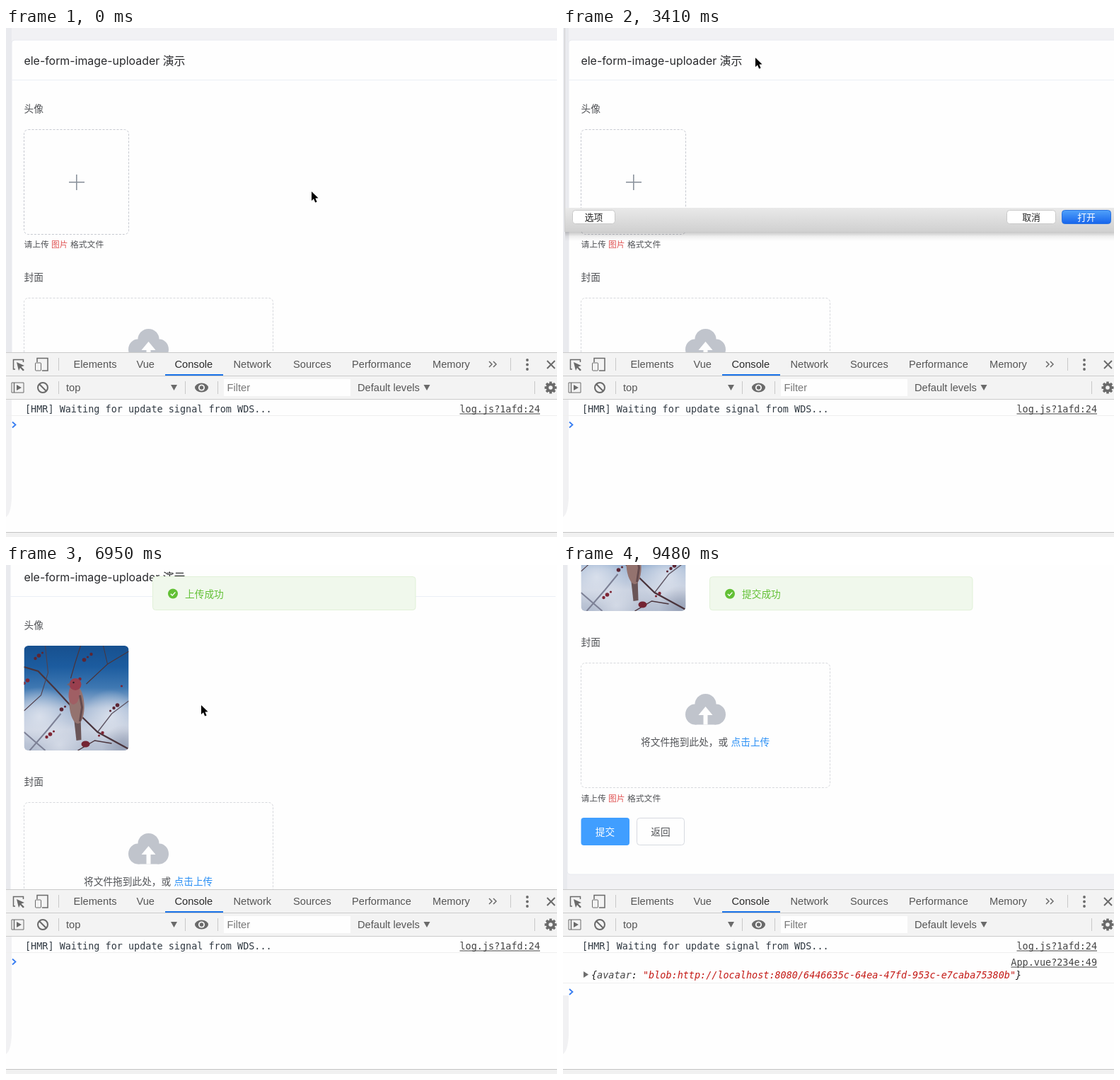
Write an HTML page with a canvas that moves like this. It is 779 px wide and 719 px high and loops after 9580 ms.

```html
<!DOCTYPE html>
<html lang="zh-CN">
<head>
<meta charset="utf-8">
<title>Image uploader demo</title>
<style>
html, body { margin: 0; width: 100%; height: 100%; overflow: hidden; background: #fefefe; }
canvas { display: block; width: 779px; height: 719px; }
</style>
</head>
<body>
<canvas id="stage" width="779" height="719"></canvas>
<script>
const ctx = document.getElementById('stage').getContext('2d');
const LOOP = 9580, TICK = 148.1;
const CJK = '"Noto Sans CJK SC", "Noto Sans CJK", sans-serif';
const UI = 'Inter, "Noto Sans CJK SC", "Noto Sans CJK", sans-serif';
const TOOL = '"Liberation Sans", sans-serif';
const MONO = '"DejaVu Sans Mono", monospace';
const BLUE = '#409eff', LINK = '#2b90f5', GREEN = '#62c035', GREY = '#505256', PAPER = '#fefefe';

// Helpers
const lerp = (a, b, p) => a + (b - a) * p;
const clamp = p => Math.max(0, Math.min(1, p));
function bezier(x1, y1, x2, y2) {
  const at = (a, b, u) => 3 * a * u * (1 - u) ** 2 + 3 * b * u * u * (1 - u) + u ** 3;
  return x => {
    let lo = 0, hi = 1;
    for (let i = 0; i < 20; i++) {
      const mid = (lo + hi) / 2;
      if (at(x1, x2, mid) < x) lo = mid; else hi = mid;
    }
    return at(y1, y2, lo);
  };
}
const ease = bezier(.25, .1, .25, 1), easeInOut = bezier(.42, 0, .58, 1);

function text(str, x, y, font, color, align = 'left') {
  ctx.font = font;
  ctx.fillStyle = color;
  ctx.textAlign = align;
  ctx.fillText(str, x, y);
}
function rect(x, y, w, h, color) {
  ctx.fillStyle = color;
  ctx.fillRect(x, y, w, h);
}
function box(x, y, w, h, r, fill, stroke, dash = []) {
  ctx.beginPath();
  ctx.roundRect(x, y, w, h, r);
  if (fill) { ctx.fillStyle = fill; ctx.fill(); }
  if (stroke) {
    ctx.setLineDash(dash);
    ctx.strokeStyle = stroke;
    ctx.lineWidth = 1;
    ctx.stroke();
    ctx.setLineDash([]);
  }
}
function line(points, color, width = 1) {
  ctx.beginPath();
  points.forEach(([x, y]) => ctx.lineTo(x, y));
  ctx.strokeStyle = color;
  ctx.lineWidth = width;
  ctx.stroke();
}
function poly(points, fill) {
  ctx.beginPath();
  points.forEach(([x, y]) => ctx.lineTo(x, y));
  ctx.closePath();
  ctx.fillStyle = fill;
  ctx.fill();
}
function disc(x, y, r, fill, ry = r, angle = 0) {
  ctx.beginPath();
  ctx.ellipse(x, y, r, ry, angle, 0, 7);
  ctx.fillStyle = fill;
  ctx.fill();
}
function glow(x, y, r, rgb, alpha) {
  const g = ctx.createRadialGradient(x, y, 0, x, y, r);
  g.addColorStop(0, `rgba(${rgb},${alpha})`);
  g.addColorStop(1, `rgba(${rgb},0)`);
  disc(x, y, r, g);
}
function ring(x, y, r, color, width, from = 0, to = Math.PI * 2) {
  ctx.beginPath();
  ctx.arc(x, y, r, from, to);
  ctx.strokeStyle = color;
  ctx.lineWidth = width;
  ctx.stroke();
}
function vertical(y0, y1, ...stops) {
  const g = ctx.createLinearGradient(0, y0, 0, y1);
  stops.forEach((c, i) => g.addColorStop(i / (stops.length - 1), c));
  return g;
}
function at(x, y, draw) {
  ctx.save();
  ctx.translate(x, y);
  draw();
  ctx.restore();
}

// Page
function photo() {
  ctx.save();
  ctx.beginPath();
  ctx.roundRect(0, 0, 148, 148, 6);
  ctx.clip();
  rect(0, 0, 148, 148, vertical(0, 148, '#17508f', '#1c5c9f', '#3f78b2', '#a9bcd6', '#c9d1e0', '#b4bed0'));
  glow(22, 100, 42, '228,232,241', .75);
  glow(122, 100, 38, '228,232,241', .75);
  glow(50, 140, 34, '228,232,241', .6);
  glow(140, 142, 30, '120,130,155', .5);
  const bark = '#4a343c', faint = '#7d8196';
  line([[8, 148], [34, 118], [52, 96]], faint, 2);
  line([[0, 122], [30, 148]], faint, 2);
  line([[104, 122], [124, 96], [148, 78]], '#5f5664', 1.4);
  line([[0, 30], [20, 36], [45, 62], [68, 87], [104, 122], [148, 146]], bark, 2.2);
  line([[80, 0], [72, 25], [66, 46]], bark, 1.2);
  line([[148, 8], [118, 26], [88, 54]], bark, 1.2);
  line([[118, 26], [112, 0]], bark);
  line([[0, 92], [24, 70], [34, 38], [30, 0]], '#51404c', 1.1);
  line([[76, 148], [100, 134], [124, 138]], bark, 1.4);
  for (let i = 0; i < 22; i++) {
    disc((i * 53 + 26) % 143, (i * 37 + 10) % 146, 1.6 + i % 3 * .6, i % 2 ? '#7e2534' : '#5c2634');
  }
  poly([[70, 98], [80, 100], [81, 133], [74, 134]], '#6a5557');
  disc(74.5, 83, 10.5, '#94736f', 27, -.06);
  disc(71, 68, 8, '#a05f64', 15, .1);
  disc(72.5, 54.5, 8.5, '#993f4e', 8.5);
  poly([[65, 52], [60.5, 55], [65, 57]], '#75616a');
  disc(70, 52, 1.2, '#251b23');
  line([[79, 70], [82, 87], [79, 107]], '#654b4e', 3);
  disc(87, 139, 6, '#742433', 4.5);
  ctx.restore();
}
function cloud() {
  const c = '#c0c4cc';
  disc(0, 14.5, 15, c, 14.5);
  disc(-15, 29, 13.5, c, 14.5);
  disc(15, 29, 13.5, c, 14.5);
  rect(-15, 20, 30, 23.5, c);
  poly([[0, 18], [10, 30], [3, 30], [3, 43.5], [-3, 43.5], [-3, 30], [-10, 30]], PAPER);
}
function tip(y) {
  const font = '11.8px ' + CJK;
  text('请上传', 25.5, y, font, GREY);
  text('图片', 64, y, font, '#e05555');
  text('格式文件', 91, y, font, GREY);
}
function spinner(time) {
  const turn = Math.PI * 2, around = 125.6;
  const p = (((time - 3990) % 1500 + 1500) % 1500) / 1500;
  const off = p < .5 ? 40 * easeInOut(p * 2) : 40 + 80 * easeInOut(p * 2 - 1);
  const len = Math.min(p < .5 ? 1 + 89 * easeInOut(p * 2) : 90, around - off);
  const rot = turn * ((time - 4740) / 2000 + 65 / 360);
  ring(99.8, 217, 17, BLUE, 2, rot + off / around * turn, rot + (off + len) / around * turn);
}
function page(k, time) {
  const scroll = k < 47 ? 0 : Math.round(lerp(29, 226, ease(clamp((k - 47) / 5))));
  const uploaded = k >= 43, loading = k >= 25 && !uploaded;
  const left = scroll ? 6 : 8, cover = uploaded ? 364 : 381;
  const label = '500 13.7px ' + CJK;
  rect(0, 0, 779, 458, '#f1f1f4');
  rect(0, 0, left, 458, '#e9eaee');
  ctx.save();
  ctx.translate(0, -scroll);
  box(left, 17, 800, cover + 282, 4, PAPER, '#e8eaef');
  text('ele-form-image-uploader 演示', 25.5, 52, '15.9px ' + UI, '#28292c');
  rect(left, 73, 771, 1, '#ebeef5');
  text('头像', 25.5, 118.5, label, GREY);
  if (uploaded) {
    at(25.5, 143, photo);
  } else {
    const active = loading || (k >= 5 && k < 15);
    box(25.5, 143.5, 148, 148, 6, null, active ? BLUE : '#c6c9d0', [3, 2]);
    const plus = loading ? '#eeeff0' : '#8c939d';
    rect(89, 217, 22, 1.6, plus);
    rect(99, 207, 1.6, 22, plus);
    if (loading) spinner(time);
    tip(310);
  }
  ctx.translate(0, cover);
  text('封面', 25.5, -24, label, GREY);
  box(25.5, .5, 352, 176, 6, null, '#d6d8dc', [3, 2]);
  at(201.5, 44, cloud);
  text('将文件拖到此处，或', 110, 117, label, GREY);
  text('点击上传', 237.5, 117, label, LINK);
  tip(196);
  const hover = k >= 53 && k <= 57;
  box(25.5, 219, 68.5, 39, 4, hover ? '#66b1ff' : BLUE);
  text('提交', 59.5, 244, '500 13.7px ' + CJK, '#fff', 'center');
  box(104.5, 219.5, 67, 38, 4, PAPER, '#d6d9e0');
  text('返回', 138, 244, label, GREY, 'center');
  ctx.restore();
}

function toast(str, top, alpha) {
  ctx.save();
  ctx.translate(0, top);
  ctx.globalAlpha = alpha * alpha;
  box(207.5, .5, 371.5, 47, 4, '#f0f8ec', '#e1f1d8');
  ctx.globalAlpha = alpha;
  disc(236, 24.5, 7, GREEN);
  line([[232.8, 24.7], [235.2, 27], [239.4, 22.4]], '#fff', 1.4);
  text(str, 253, 29.5, '500 13.7px ' + CJK, GREEN);
  ctx.restore();
}
function toasts(time) {
  const progress = (start, span = 400) => ease(clamp((time - start) / span));
  const leave = progress(9110);
  if (time > 8210) {
    toast('提交成功', lerp(32, 80, progress(8210)) - 64 * leave, progress(8210, 300));
  }
  if (time > 6400 && leave < .99) {
    toast('上传成功', lerp(-32, 16, progress(6330)) - 48 * leave, progress(6330, 300) * (1 - progress(9110, 300)));
  }
}

// File dialog
const places = ['应用程序', 'Desktop', '下载', 'qiulanmuyuan', 'web', 'api', 'admin', 'spider',
  'meadow-vue', 'plank-wepy', 'schedule-wepy', 'meadow-admin', 'meadow-uniapp'];

function placeIcon(i) {
  const c = '#737373';
  if (i === 0) disc(0, 0, 7.5, c);
  else if (i === 1) {
    box(-8.5, -6.5, 17, 13, 1.5, '#dedede', c);
    rect(-6, -4, 12, 6, '#b9b9b9');
    rect(-6, 3.5, 12, 1, c);
  } else if (i === 2) {
    disc(0, 0, 8.5, '#4a4a4a');
    rect(-1.3, -5, 2.6, 6, '#fff');
    poly([[-4.5, 0], [4.5, 0], [0, 5]], '#fff');
  } else if (i === 3) {
    line([[-8.5, 0], [0, -8], [8.5, 0]], c, 1.4);
    line([[-5.5, -2], [-5.5, 7.5], [5.5, 7.5], [5.5, -2]], c, 1.2);
    box(-2, 1, 4, 6.5, 0, null, c);
    rect(4, -7, 2, 4, c);
  } else {
    line([[-8.5, -3], [-8.5, -6], [-2.5, -6], [-1, -4.5], [8.5, -4.5], [8.5, -3]], c);
    box(-8.5, -3, 17, 9.5, 1.5, '#d8d8d8', c);
  }
}
function dialogButton(str, x, w, y, fill, color) {
  box(x + .5, y - 9.5, w - 1, 19, 4, fill, fill === '#fff' ? '#c9c9c9' : '#2a73e0');
  text(str, x + w / 2, y + 5, '12.8px ' + CJK, color, 'center');
}
function dialogFooter(y, enabled) {
  dialogButton('选项', 13, 61, y, '#fff', '#222');
  dialogButton('取消', 627, 70, y, '#fff', '#222');
  const blue = vertical(y - 10, y + 10, '#52a3fa', '#1462ec');
  dialogButton('打开', 705, 70, y, enabled ? blue : '#fff', enabled ? '#fff' : '#c4c4c4');
}
function dropShadow(y) {
  rect(3, y, 776, 13, vertical(y, y + 13, 'rgba(0,0,0,.22)', 'rgba(0,0,0,.06)', 'rgba(0,0,0,0)'));
}
function dialog(bottom, enabled) {
  at(0, bottom - 402, () => {
    dropShadow(402);
    rect(2, 0, 777, 402, '#f5f5f5');
    rect(2, 0, 1, 402, '#c6c6c6');
    rect(204, 4, 575, 357, PAPER);
    rect(3, 4, 776, 1, '#dadada');
    rect(204, 4, 1, 357, '#d9d9d9');
    rect(3, 79, 201, 24, '#d0d0d0');
    text('个人收藏', 12, 21.5, '500 11px ' + CJK, '#6e6e6e');
    places.forEach((name, i) => {
      const y = 40.5 + 25.5 * i;
      at(29, y, () => placeIcon(i));
      text(name, 44, y + 4.7, '12.4px ' + UI, '#555');
    });
    rect(3, 360, 776, 1, '#d3d3d3');
    dialogFooter(381.5, enabled);
    rect(3, 401, 776, 1, '#bdbdbd');
  });
}
function closingDialog() {
  dropShadow(288);
  rect(3, 254, 776, 34, vertical(254, 288, '#e9e9e9', '#d0d0d0'));
  rect(2, 0, 1, 288, '#cfcfcf');
  dialogFooter(267, true);
}

// Developer tools
const tabs = [['Elements', 95.5], ['Vue', 184.5], ['Console', 238.5], ['Network', 321.5],
  ['Sources', 406], ['Performance', 489], ['Memory', 603]];

function toolIcons() {
  const c = '#6a6a6a';
  line([[13, 482], [10.5, 482], [10.5, 468.5], [24.5, 468.5], [24.5, 472]], c, 1.5);
  poly([[15, 472], [26, 477], [21.5, 478.5], [26, 483], [24, 484.5], [20, 480], [18, 484]], c);
  line([[44, 472], [44, 466.5], [59, 466.5], [59, 484], [51, 484]], c, 1.5);
  box(41.5, 473, 8, 11, 1, '#f3f3f3', c);
  [74, 713].forEach(x => rect(x, 466, 1, 18, '#c8c8c8'));
  [683, 689].forEach(x => line([[x, 471], [x + 4, 475], [x, 479]], c, 1.5));
  [469, 475.5, 482].forEach(y => disc(737, y, 1.9, c));
  line([[765, 470], [776, 481]], c, 2);
  line([[776, 470], [765, 481]], c, 2);
  box(8, 501, 17, 14, 0, null, c);
  line([[11.5, 501], [11.5, 515]], c, 1.4);
  poly([[15, 504], [22, 508], [15, 512]], c);
  ring(52, 508, 7, c, 2);
  line([[47, 503], [57, 513]], c, 2);
  [74, 253, 299, 747].forEach(x => rect(x, 499, 1, 18, '#c8c8c8'));
  [237.5, 595].forEach(x => poly([[x - 4.5, 504], [x + 4.5, 504], [x, 512]], c));
  disc(276.5, 508, 9.5, c, 6.5);
  disc(276.5, 508, 4.6, '#f3f3f3');
  disc(276.5, 508, 2.7, c);
  for (let i = 0; i < 8; i++) {
    const a = i * Math.PI / 4;
    line([[770, 508], [770 + 8.5 * Math.cos(a), 508 + 8.5 * Math.sin(a)]], c, 3.5);
  }
  disc(770, 508, 6.5, c);
  disc(770, 508, 2.8, '#f3f3f3');
}
function sourceLink(str, y) {
  const font = '13.47px ' + MONO;
  text(str, 755, y, font, '#444', 'right');
  const w = ctx.measureText(str).width;
  rect(755 - w, y + 1.5, w, 1, '#444');
}
function devtools(k) {
  const logged = k >= 56, tool = '14.65px ' + TOOL, mono = '13.47px ' + MONO;
  rect(0, 458, 779, 261, PAPER);
  rect(0, 458, 779, 67, '#f3f3f3');
  [458, 491, 524].forEach(y => rect(0, y, 779, 1, '#cbcbcb'));
  tabs.forEach(([name, x]) => text(name, x, 480, tool, name === 'Console' ? '#2b2b2b' : '#555'));
  rect(225, 489, 82, 2, '#1a73e8');
  rect(308, 496, 179, 24, PAPER);
  text('top', 85, 513, tool, '#555');
  text('Filter', 312.5, 513, tool, '#767676');
  text('Default levels', 497, 513, tool, '#555');
  toolIcons();

  ctx.beginPath();
  ctx.moveTo(0, logged ? 608 : 525);
  ctx.lineTo(8, logged ? 608 : 525);
  ctx.lineTo(8, 664);
  ctx.quadraticCurveTo(7, 686, 0, 691);
  ctx.fillStyle = '#f1f1f3';
  ctx.fill();

  text('[HMR] Waiting for update signal from WDS...', 27, 543, mono, '#303942');
  sourceLink('log.js?1afd:24', 543);
  rect(0, 547, 779, 1, '#efefef');
  if (logged) {
    const italic = 'italic ' + mono;
    sourceLink('App.vue?234e:49', 566);
    poly([[29, 574], [36, 578.5], [29, 583]], '#6e6e6e');
    let x = 40;
    [['{', '#222'], ['avatar', '#444'], [': ', '#222'],
      ['"blob:http://localhost:8080/6446635c-64ea-47fd-953c-e7caba75380b"', '#c41a16'], ['}', '#222']
    ].forEach(([str, color]) => {
      text(str, x, 584, italic, color);
      x += ctx.measureText(str).width;
    });
    rect(0, 590, 779, 1, '#efefef');
  }
  const prompt = logged ? 603 : 560.5;
  line([[9, prompt - 4], [13.5, prompt], [9, prompt + 4]], '#367cf1', 1.8);
  if ((k >= 1 && k < 5) || k === 8 || k === 9) rect(26, 551, 1, 16, '#222');
  rect(0, 712, 779, 1, '#c4c4c4');
  rect(0, 713, 779, 6, '#f1f1f1');
}

// Pointer
const route = [[0, 432, 231], [5, 110, 215], [12, 110, 215], [14, 408, 107], [15, 359, 121],
  [19, 272, 42], [23, 272, 42], [29, 270, 96], [32, 271, 129], [35, 276, 198], [50, 276, 198],
  [53, 70, 371], [57, 70, 371], [61, 70, 682]];

function outlined(points, fill, stroke) {
  ctx.lineJoin = 'round';
  line([...points, points[0], points[1]], stroke, 1.8);
  poly(points, fill);
  ctx.lineJoin = 'miter';
}
function arrow(x, y) {
  at(x, y, () => outlined([[0, 0], [0, 13], [3, 10.3], [5.2, 15.5], [7.6, 14.5], [5.4, 9.4], [9.5, 9.2]], '#000', '#fff'));
}
function hand(x, y) {
  at(x, y, () => {
    outlined([[-2, 0], [0, 0], [1, 4.5], [4, 4.5], [7, 6], [8, 8], [7, 12], [6, 15.5], [0, 15.5],
      [-2, 12], [-5, 8], [-4, 7], [-1.5, 8.5]], '#fff', '#111');
    [1, 3, 5].forEach(i => line([[i, 9], [i, 13]], '#111', .8));
  });
}
function pointer(k) {
  if (k > 61) return;
  const next = Math.max(1, route.findIndex(stop => stop[0] >= k));
  const [k0, x0, y0] = route[next - 1], [k1, x1, y1] = route[next];
  const p = (k - k0) / (k1 - k0);
  const overButton = (k >= 5 && k <= 12) || (k >= 53 && k <= 57);
  (overButton ? hand : arrow)(lerp(x0, x1, p), lerp(y0, y1, p));
  if (k === 15) arrow(408, 107);
}

function draw(k) {
  const time = k * TICK;
  rect(0, 0, 779, 719, PAPER);
  page(k, time);
  if (k >= 12 && k <= 22) dialog([150, 320][k - 12] || 402, k >= 18);
  if (k === 23) closingDialog();
  toasts(time);
  devtools(k);
  pointer(k);
}

function loop(now) {
  draw(Math.min(64, Math.floor((now % LOOP + 10) / 148)));
  requestAnimationFrame(loop);
}
requestAnimationFrame(loop);
</script>
</body>
</html>
```
